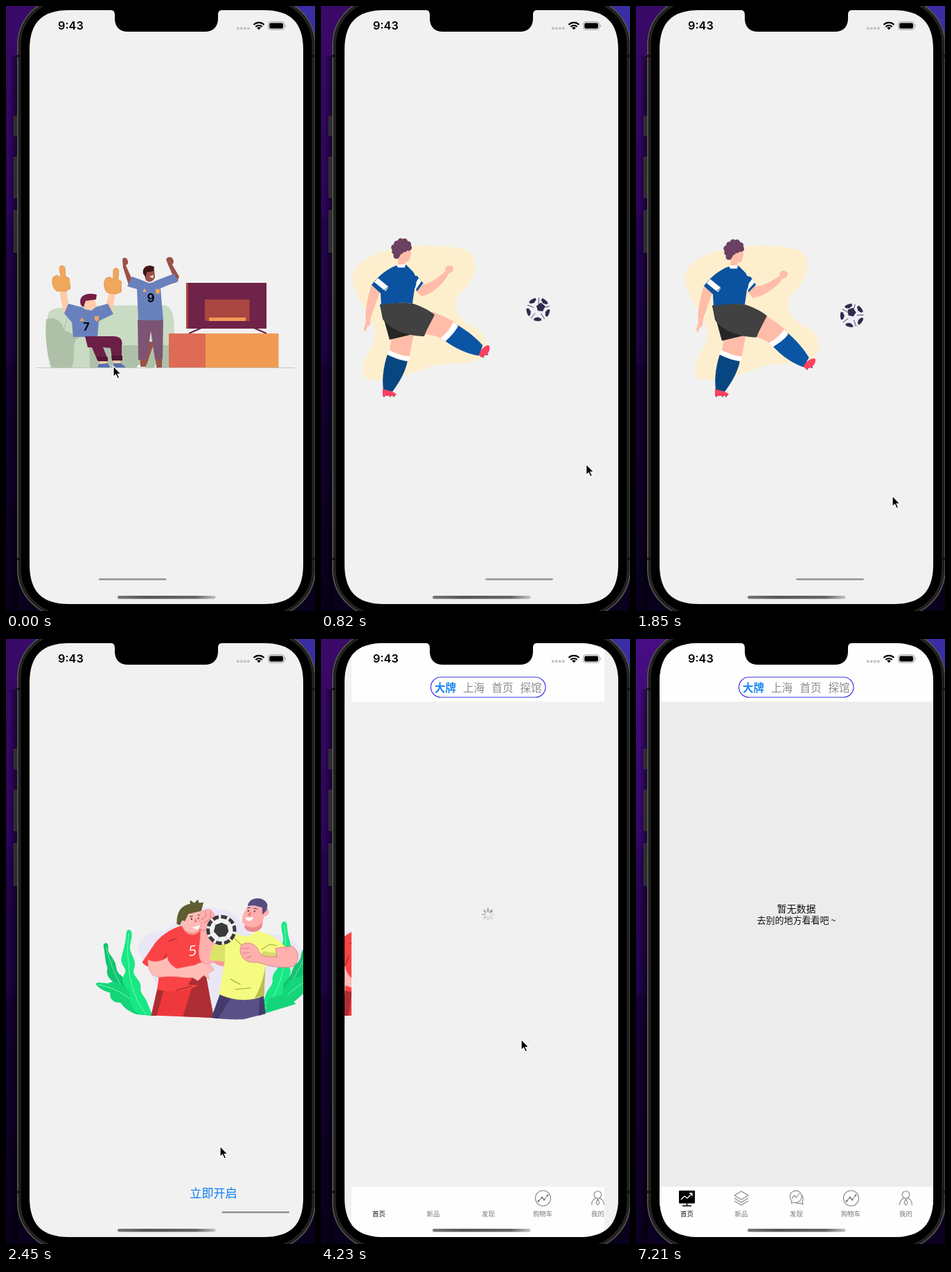
These frames come from a looping animation (446x872 px, 7.31 s). An HTML page:

```html
<!DOCTYPE html>
<html lang="zh-CN">
<head>
<meta charset="utf-8">
<title>Onboarding</title>
<style>
/* --o page offset, --u heading duel, --k kick, --s push slide */
@property --o { syntax: "<number>"; inherits: true; initial-value: 0 }
@property --u { syntax: "<number>"; inherits: true; initial-value: 0 }
@property --k { syntax: "<number>"; inherits: true; initial-value: 0 }
@property --s { syntax: "<number>"; inherits: true; initial-value: 1 }

html, body { margin: 0; width: 100%; height: 100%; overflow: hidden; background: #000 }
svg { display: block; width: 446px; height: 872px }
text { font-family: "Noto Sans CJK SC", "Noto Sans CJK", "Noto Sans", sans-serif }
.mid { text-anchor: middle }

.app { animation: scroll 7310ms infinite, push 7310ms infinite }
.old { transform: translateX(calc((1 - var(--s)) * -112px)) }
.new { transform: translateX(calc(var(--s) * 395px)) }
.pages { transform: translateX(calc(var(--o) * -395px)) }
.bar { transform: translateX(calc(var(--o) * 97.2px)) }
@keyframes scroll {
  0%, .82% { --o: 0; animation-timing-function: cubic-bezier(.2,.6,.3,1) }
  3.7%, 10.94% { --o: 1; animation-timing-function: cubic-bezier(.3,.2,.3,1) }
  15.05%, 21.89% { --o: 2; animation-timing-function: cubic-bezier(.3,.2,.3,1) }
  25.31%, 30.1% { --o: 1; animation-timing-function: ease-in-out }
  33.45%, 34.15% { --o: 1.8265; animation-timing-function: ease-out }
  36.25%, 100% { --o: 2 }
}
@keyframes push {
  0%, 51.44% { --s: 1; animation-timing-function: cubic-bezier(.25,.5,.4,1) }
  55.95% { --s: .07 }
  57.8%, 58.6% { --s: .0253 }
  58.69%, 100% { --s: 0 }
}

/* two fans */
.wave { animation: wave 7310ms infinite }
@keyframes wave { 0%, .82% { rotate: 0deg } 4% { rotate: 7deg } 8%, 100% { rotate: 0deg } }

/* kicker */
.kick { animation: kick 7310ms cubic-bezier(.37,0,.63,1) infinite }
.leg { transform: rotate(calc(var(--k) * 7deg)); transform-origin: 165px 450px }
.arm { transform: rotate(calc(var(--k) * 5deg)); transform-origin: 165px 405px }
.body { transform: translateY(calc(var(--k) * 1px)) }
.shot { transform: translate(calc(321px - var(--k) * 18px), calc(443px + var(--k) * 6px)) rotate(calc(var(--k) * -40deg)) }
@keyframes kick { 0% { --k: .5 } 3.97%, 4.7% { --k: 0 } 12% { --k: -1 } 22% { --k: 1 } 32% { --k: -1 } 100% { --k: .5 } }

/* heading duel */
.duel { animation: duel 7310ms cubic-bezier(.37,0,.63,1) infinite }
@keyframes duel {
  0%, 4.57% { --u: 1.15 } 20.71% { --u: -.1 } 36.85% { --u: 1.15 }
  53% { --u: -.1 } 69.14%, 100% { --u: 1.15 }
}
.lean { transform: skewX(calc(var(--u) * -10deg)) scaleY(calc(1 + var(--u) * .04)); transform-origin: 0 543px }
.redarm { transform: translate(calc(var(--u) * 9px), calc(var(--u) * -7px)) rotate(calc(var(--u) * -17deg)); transform-origin: 125px 475px }
.yhead { transform: translate(calc(var(--u) * 5px), calc(var(--u) * -7px)) rotate(calc(var(--u) * 9deg)); transform-origin: 280px 425px }
.fist { transform: translateX(calc(var(--u) * 15px)) rotate(calc(var(--u) * -22deg)); transform-origin: 215px 455px }
.yarm { transform: translate(calc(var(--u) * 3px), calc(var(--u) * -3px)) rotate(calc(var(--u) * 22deg)); transform-origin: 342px 460px }
.header { transform: translate(calc(193px + var(--u) * 48px), calc(364px + var(--u) * 54px)) rotate(calc(var(--u) * 50deg)) }

.btn { animation: press 7310ms infinite }
@keyframes press { 0%, 46.24% { opacity: 1 } 46.79%, 48.15% { opacity: .2 } 50.62%, 100% { opacity: 1 } }

/* home screen */
.spin { animation: gone 7310ms infinite }
.spin g { animation: turn 609.1667ms steps(8) infinite; transform-origin: 231px 397px }
@keyframes turn { to { rotate: 360deg } }
@keyframes gone { 0%, 71% { opacity: 1 } 71.01%, 100% { opacity: 0 } }
.icons { animation: icons 7310ms infinite }
@keyframes icons { 0%, 60.73% { opacity: 0 } 60.74%, 100% { opacity: 1 } }
.empty { animation: empty 7310ms infinite }
@keyframes empty { 0%, 71% { opacity: 0 } 77.15%, 100% { opacity: 1 } }
.edge { animation: edge 7310ms infinite }
@keyframes edge { 0%, 55.94% { opacity: 0 } 55.95%, 98.62% { opacity: 1 } 98.63%, 100% { opacity: 0 } }
.last { animation: last 7310ms infinite }
@keyframes last { 0%, 98.62% { opacity: 0 } 98.63%, 100% { opacity: 1 } }

.cursor { animation: cursor 7310ms ease-in-out infinite }
@keyframes cursor {
  0%, .82% { translate: 155px 519px }
  3.9%, 4.7% { translate: 218px 519px }
  10.94% { translate: 385px 660px }
  14% { translate: 260px 682px }
  17.6%, 18.4% { translate: 350px 689px }
  21.89% { translate: 250px 700px }
  25.31% { translate: 370px 706px }
  30.1% { translate: 385px 720px }
  33.45%, 34.15% { translate: 309px 731px }
  37% { translate: 240px 775px }
  41% { translate: 246px 823px }
  44.46% { translate: 238px 794px }
  47.6%, 48.3% { translate: 286px 578px }
  57.87%, 84.95% { translate: 289px 577px }
  92.61%, 100% { translate: 430px 876px }
}
</style>
</head>
<body>
<svg viewBox="0 0 446 872">
<defs>
  <linearGradient id="night" x1="0" y1="0" x2="0" y2="1">
    <stop offset="0" stop-color="#3a0a68"/><stop offset=".34" stop-color="#2c0559"/>
    <stop offset=".355" stop-color="#24044d"/><stop offset=".585" stop-color="#1d0342"/><stop offset=".595" stop-color="#150134"/><stop offset="1" stop-color="#09001b"/>
  </linearGradient>
  <linearGradient id="dusk" x1="0" y1="0" x2="0" y2="1">
    <stop offset="0" stop-color="#470d84"/><stop offset=".34" stop-color="#340869"/>
    <stop offset=".355" stop-color="#2b065b"/><stop offset=".585" stop-color="#21044b"/><stop offset=".595" stop-color="#170238"/><stop offset="1" stop-color="#0b0020"/>
  </linearGradient>
  <linearGradient id="shade"><stop offset=".3" stop-opacity="0"/><stop offset="1" stop-opacity=".55"/></linearGradient>
  <linearGradient id="home"><stop offset="0" stop-color="#777"/><stop offset=".3" stop-color="#555"/><stop offset=".8" stop-color="#666"/><stop offset="1" stop-color="#c4c4c4"/></linearGradient>
  <clipPath id="screen"><path d="M34 63C34 24 52 6 91 6H372C411 6 429 24 429 63V805C429 844 411 862 372 862H91C52 862 34 844 34 805Z"/></clipPath>
  <clipPath id="round"><circle r="17"/></clipPath>
  <g id="leafA"><path fill="#17e884" d="M105 425C105 417 114 417 113 427C113 436 108 442 112 452C115 460 120 466 116 476C113 486 126 490 126 502C124 512 134 516 136 526L143 543L124 541C108 530 110 516 110 508C98 498 98 490 103 482C107 474 96 470 98 460C100 450 104 440 105 425Z"/><path fill="none" stroke="#7df5b9" d="M109 424C104 455 110 465 109 480C113 500 117 520 134 541"/></g>
  <g id="leafB"><path fill="#12c472" d="M72 442C73 436 80 437 79 445C78 453 84 456 87 463C92 470 89 476 95 483C104 488 102 498 108 504C118 512 122 524 130 542L118 539C100 534 96 524 96 514C84 508 84 502 86 494C78 488 76 482 78 474C74 464 75 456 72 442Z"/><path fill="none" stroke="#6eeaab" d="M76 444C82 470 92 495 122 538"/></g>
  <g id="leafC"><path fill="#14d579" d="M61 497C64 493 72 497 80 496C90 490 97 499 104 502C116 502 122 512 126 520C132 528 138 534 143 543L120 541C108 538 102 528 96 524C86 525 80 517 82 510C74 508 64 503 61 497Z"/><path fill="none" stroke="#7df5b9" d="M64 498C90 503 112 515 132 541"/></g>
  <path id="foam" fill="#f0a75c" stroke="#d98d42" stroke-width=".7" d="M68 391L73 388L79 391L77 378C77 373 85 373 85 378L86 390L91 392L93 407L87 411L73 411C66 405 66 396 68 391Z"/>
  <path id="patch" fill="#2f2b4d" d="M-6-18L6-18L5-13L0-11L-5-13Z"/>
</defs>

<rect width="446" height="872" fill="url(#night)"/>
<rect class="last" width="446" height="872" fill="url(#dusk)"/>
<rect y="72" width="17" height="800" fill="url(#shade)"/>
<path fill="#3b2da4" d="M400 0H446V40Z"/>
<g fill="#2b2b2c" stroke="#48484a" stroke-width=".7">
  <rect x="11.5" y="159" width="6" height="28"/><rect x="11.5" y="218" width="6" height="58"/><rect x="11.5" y="295" width="6" height="60"/>
</g>
<rect x="17" y="-12" width="429" height="892" rx="68" stroke="#53524e" stroke-width="2"/>
<rect x="20" y="-9" width="423" height="886" rx="65" fill="none" stroke="#242422" stroke-width="3"/>
<path stroke="#111" stroke-width="3" d="M16 72H21M16 797H21M442 72H446M442 797H446"/>

<g clip-path="url(#screen)" class="app">
  <rect x="34" y="6" width="395" height="856" fill="#f1f1f1"/>
  <g class="old">
    <g class="pages">

      <!-- fans at the TV -->
      <g>
        <path fill="#c9dbc3" d="M62 441C75 430 92 438 110 432L228 431C240 433 243 448 243 470V521H64C58 500 56 460 62 441Z"/>
        <path fill="#aec1a8" d="M58 452C70 446 82 455 84 468C95 470 102 478 110 478L118 489H240V521H66C58 500 56 470 58 452Z"/>
        <path fill="#c9dbc3" d="M100 482C105 475 117 476 120 483L121 521H95C100 508 96 494 100 482Z"/>
        <path fill="none" stroke="#a9bba3" d="M84 468C85 455 90 446 94 440M160 487V521"/>
        <path stroke="#c4c4c4" stroke-width="1.2" d="M44 521.5H417"/>
        <g class="wave" style="transform-origin:92px 440px"><path fill="#ffcba9" d="M77 410L87 409L92 440L83 443Z"/><use href="#foam"/></g>
        <g class="wave" style="transform-origin:145px 440px"><path fill="#ffcba9" d="M149 413L158 412L153 444L142 441Z"/><use href="#foam" transform="rotate(9 160 400) translate(75 4)"/></g>
        <path fill="#6881bd" d="M90 429L109 434C117 440 124 439 130 434L147 429L155 444L134 454L132 477H97L95 456L84 443Z"/>
        <path fill="#f0a75c" d="M128 447h6v5l-3 3-3-3ZM106 454l4-5 3 5Z"/>
        <path fill="#ffcba9" d="M110 423L128 421L130 431L124 439C116 438 112 433 109 428Z"/>
        <path fill="#761c48" d="M108 431C104 419 114 412 131 416L130 423L115 425L112 434Z"/>
        <path fill="#6b1f47" d="M114 476H152C166 475 169 482 167 490V509H153L151 493L140 492L147 509L132 511L124 492H118Z"/>
        <path fill="#521533" d="M131 506H147V512H133ZM152 504H168V511H153Z"/>
        <path fill="#ffcba9" d="M135 512H145V517H135ZM155 511H165V516H155Z"/>
        <path fill="#596fae" d="M134 516L147 515L150 521H132ZM155 515L166 515L173 521H155Z"/>
        <text class="mid" x="116" y="467.5" font-size="16" font-weight="700" style="font-family:Inter,sans-serif">7</text>

        <g class="wave" style="transform-origin:185px 398px"><path fill="#9a5148" d="M168 365C171 360 177 364 176 371L173 374L182 394L178 405L169 377Z"/></g>
        <g class="wave" style="transform-origin:232px 398px"><path fill="#9a5148" d="M231 365C235 359 242 362 242 369L240 373L250 390L247 398L222 405L223 395L241 389L234 373Z"/></g>
        <path fill="#9a5148" d="M192 484H226L225 517H217L212 490L203 517H194Z"/>
        <path fill="#7d5473" d="M190 452L227 451L226 509H215L209 468L203 510H191Z"/>
        <path fill="#fff" d="M189 521C189 516 196 516 202 521ZM214 521L218 515L225 521Z"/><path fill="#9a5148" d="M194 510h8v10h-8ZM217 510h8v11h-8Z"/>
        <path fill="#6881bd" d="M182 390L201 397C207 401 211 399 216 396L242 386L249 396L223 407L227 453H191L189 408L175 404Z"/>
        <path fill="#f0a75c" d="M216 408h6v5l-3 3-3-3ZM197 412l3-5 3 5Z"/>
        <path fill="#9a5148" d="M199 382L214 380L215 391C211 400 203 399 201 393Z"/>
        <path fill="#3f1615" d="M198 386C196 375 206 372 214 376L213 382L203 384L202 391Z"/><path fill="#fff" d="M207 390l6-2-1 4Z"/>
        <text class="mid" x="209" y="427" font-size="17" font-weight="700" style="font-family:Inter,sans-serif">9</text>

        <path stroke="#6b1f47" stroke-width="2" d="M282 464L264 472M358 464L376 472"/>
        <rect x="260" y="399" width="116" height="66" fill="#702349"/><rect x="260" y="399" width="3" height="66" fill="#a9463f"/>
        <rect x="287" y="423" width="64.5" height="31" fill="#a9463f"/><rect x="293" y="449" width="53" height="5" fill="#f09a54"/>
        <rect x="235" y="472" width="53" height="49" fill="#dd6b55"/><rect x="288" y="472" width="105.5" height="49" fill="#f09a54"/>
      </g>

      <!-- kicker -->
      <g transform="translate(395)"><g class="kick">
        <path fill="#fdefcd" d="M95 362C120 345 200 340 235 352C255 365 248 390 235 405C212 425 215 445 240 460C265 470 268 490 260 505C240 520 210 512 180 520C150 535 100 545 88 535C78 515 100 495 103 475C105 455 85 435 75 410C66 390 70 375 95 362Z"/>
        <path fill="#ffbda9" d="M127 478L123 502L152 509L159 472Z"/>
        <path fill="#084681" d="M121 502C115 520 113 537 115 553L128 556C140 540 148 524 150 511Z"/>
        <path fill="#fff" d="M123 496C133 500 143 505 154 505L151 512C140 511 130 507 120 502Z"/>
        <path fill="#ff3f61" d="M114 552L128 556L134 559L132 562H114Z"/><path stroke="#333" stroke-width="1.5" d="M116 562v1.5M125 562v1.5M130 562v1.5"/>
        <g class="body">
          <path fill="#262626" d="M110 432L124 482L162 473L160 440Z"/>
          <g class="leg">
            <path fill="#ffbda9" d="M186 444C198 450 210 458 219 464L199 488C190 479 182 478 172 475Z"/>
            <path fill="#0b55a5" d="M220 467C234 478 246 490 253 501L246 515C230 511 212 500 199 487Z"/>
            <path fill="#fff" d="M215 462L221 469C216 477 208 483 200 489L194 483C203 478 210 471 215 462Z"/>
            <path fill="#ff3f61" d="M246 514C249 506 258 500 262 502C265 510 256 518 248 517Z"/>
            <path stroke="#333" stroke-width="1.5" d="M251 517l1 1.5M257 514l2 1.5"/>
          </g>
          <path fill="#414141" d="M110 431C130 428 145 428 158 430C170 434 182 440 189 446C185 455 178 466 174 477C150 477 125 468 114 452Z"/>
          <path fill="#ffbda9" d="M98 403C91 425 88 445 90 455L87 466L89 471L92 463L96 461L97 450L110 413Z"/>
          <g class="arm">
            <path fill="#ffbda9" d="M160 409L169 420C186 418 205 401 211 390C218 390 221 381 214 379C207 378 205 384 207 386C195 395 183 403 172 403Z"/>
            <path fill="#0b52a0" d="M155 388L165 390L173 401L163 412Z"/><path fill="#fff" d="M167 393L171 398L161 410L158 406Z"/>
          </g>
          <path fill="#0b52a0" d="M134 375C120 380 108 390 98 403L111 415L112 432C130 428 145 428 157 430L160 409C165 400 162 390 158 384L148 374Z"/>
          <path fill="#fff" d="M107 393L123 406L118 412L102 399Z"/><path fill="none" stroke="#084681" d="M112 414L126 403"/>
          <path fill="#ffbda9" d="M138 352L152 350L155 356C154 369 150 371 147 369L146 375L136 376L137 364Z"/>
          <path fill="#fff" d="M134 374L147 373L146 378L136 378Z"/>
          <path fill="#6b4060" stroke="#6b4060" stroke-width="9" stroke-linecap="round" stroke-dasharray="0 6.5" d="M134 361L130 350L136 342L143 339L150 343L153 349L143 352L137 356Z"/>
        </g>
        <g class="shot">
          <circle r="17" fill="#efeef5"/>
          <g clip-path="url(#round)">
            <path fill="none" stroke="#2f2b4d" stroke-width=".8" d="M0 7V17M6.7 2L16 5M-6.7 2L-16 5M4-6L10-14M-4-6L-10-14"/>
            <path fill="#cbc9dc" d="M-17 6C-10 18 10 18 17 6L17 18H-17Z" opacity=".6"/>
            <path fill="#2f2b4d" d="M0 5L-6 1L-4-7H4L6 1Z" transform="translate(1 -3)"/>
            <use href="#patch"/><use href="#patch" transform="rotate(72)"/><use href="#patch" transform="rotate(144)"/><use href="#patch" transform="rotate(216)"/><use href="#patch" transform="rotate(288)"/>
          </g>
        </g>
      </g></g>

      <!-- heading duel -->
      <g transform="translate(790)"><g class="duel">
        <path fill="#e9e7f6" d="M122 450C120 432 138 420 160 420L190 398C205 384 245 382 264 400L285 425C320 422 352 428 358 452C360 490 340 500 320 512L300 540L235 545L150 500Z"/>
        <use href="#leafB"/><use href="#leafC"/><use href="#leafA"/>
        <use href="#leafB" transform="matrix(-1 0 0 1 448 -17)"/><use href="#leafC" transform="matrix(-1 0 0 1 459 -15)"/><use href="#leafA" transform="matrix(-1 0 0 1 442 -12)"/>
        <path fill="#14d579" d="M304 540L310 518L335 512L350 526Z"/>

        <g class="lean">
          <path fill="#f79a99" d="M214 440L243 438L242 472C232 478 219 472 213 466L222 460Z"/>
          <path fill="#ad2d34" d="M192 430L212 426L244 437L216 462L203 470Z"/>
          <path fill="#ee393c" d="M143 500L141 542.5L232 546L203 470Z"/>
          <path fill="#ad2d34" d="M193 500L187 544L232 546L203 470ZM143 506H153L149 543H141Z"/>
          <path fill="#fa4344" d="M163 418C150 421 136 430 128 442L114 469C122 477 133 477 141 474L143 507C165 512 190 508 203 500L200 462L208 425L192 418C185 432 168 430 163 418Z"/>
          <path fill="none" stroke="#ad2d34" stroke-width="1.5" d="M141 474L147 457M147 440L158 436M170 508L192 502M150 512L146 534"/>
          <path fill="#ad2d34" d="M201 470L186 500L203 501Z"/>
          <text x="178" y="460" font-size="20" fill="#fff" transform="rotate(-8 183 452)" style="font-family:'Open Sans',sans-serif">5</text>
          <path fill="#f09793" d="M162 414L188 418L189 426C182 436 168 430 163 420Z"/>
          <path fill="#ffbcb6" d="M161 408L167 401L187 397L190 413C190 422 186 427 179 428C170 428 165 422 161 418Z"/>
          <path fill="#5e5c30" d="M153 410C152 395 158 390 168 388L167 383L174 387L178 382L181 387L187 386L186 398L168 402L165 412L161 411L159 418L154 416Z"/>
          <path fill="none" stroke="#5e5c30" stroke-width="1.5" d="M171 406l4-1M182 404l4-1"/><g fill="#333"><circle cx="174" cy="409" r="1.2"/><circle cx="184" cy="408" r="1.2"/></g>
          <path fill="#f07f7c" d="M179 407l4 6-4 1Z"/><path fill="#fff" d="M177 421L188 418L186 424Z"/>
          <path class="redarm" fill="#ffbcb6" stroke="#eb9a96" stroke-width=".6" d="M114 469C111 488 117 497 134 500C150 503 160 511 172 513L179 520L188 515L195 523L194 514L203 512C201 500 189 493 178 497L152 494C145 487 141 481 141 474C133 477 122 477 114 469Z"/>
        </g>

        <path fill="#5a5088" d="M241 510L228 546C245 548 265 549 275 548L306 540L303 512Z"/>
        <path fill="#443b6c" d="M241 510L228 546L238 547L256 517ZM298 515L296 543L306 540L303 512Z"/>
        <g class="fist"><path fill="#ffb0ae" stroke="#e88e90" stroke-width=".6" d="M242 440C230 441 222 436 226 420L233 415C241 410 240 395 234 392C224 388 213 395 216 407L212 415C206 430 195 443 195 455C196 466 215 468 230 463Z"/><path fill="none" stroke="#d97c80" d="M218 402l9-2 2-8M220 408l12-3 3-9M211 416l12 3"/></g>
        <path fill="#f4fb80" d="M260 421C270 431 285 431 293 420L308 425C322 430 332 440 337 447L312 460L306 470L304 514C285 523 260 522 239 512L247 465L225 462L229 444Z"/>
        <path fill="#dbe26a" d="M229 444L248 436L247 465L225 462Z"/>
        <path fill="#b9bd52" d="M306 470L304 514L290 518C298 505 303 490 306 470Z"/>
        <path fill="none" stroke="#b9bd52" stroke-width="1.5" d="M262 432L272 442M300 448L312 440L322 442M255 490L270 498M262 505L285 503"/>
        <g class="yhead">
          <path fill="#ed8688" d="M272 415L295 405L295 420C290 432 272 431 270 423Z"/>
          <path fill="#ffaeac" d="M270 393L295 388L299 393C304 395 301 404 296 404L294 414C288 425 272 425 266 417C263 408 268 400 270 393Z"/>
          <path fill="#544e80" d="M270 393C269 380 291 374 298 387V395L293 402L291 392L279 391Z"/>
          <path fill="#fff" d="M269 410L281 408C279 416 271 416 269 410Z"/>
          <g fill="#333"><circle cx="272" cy="400" r="1.1"/><circle cx="281" cy="399" r="1.1"/></g><path fill="none" stroke="#544e80" stroke-width="1.3" d="M270 396l4-1M279 395l5 0"/><path fill="#ed7375" d="M276 400l-4 6 4 1Z"/>
        </g>
        <g class="yarm"><path fill="#b9bd52" d="M300 470L322 464L330 482L300 489Z" opacity=".5"/><path fill="#ffb0ae" stroke="#d97c80" stroke-width=".8" d="M336 447C349 450 355 463 348 474C335 483 314 487 302 487C293 489 290 494 279 491C272 488 265 479 269 472C275 464 289 465 294 472C304 480 313 472 322 470L315 459Z"/><path fill="none" stroke="#d97c80" d="M270 478l10-4M274 484l9-5M281 489l6-6"/></g>
        <g class="header">
          <circle r="21" fill="#f3f3f3"/>
          <circle r="19.2" fill="none" stroke="#3a3a3a" stroke-width="5" stroke-dasharray="8.8 3.264"/>
          <path fill="#3a3a3a" d="M0-11L8-7L11 1L6 9L-5 10L-11 2L-8-7Z"/>
          <path stroke="#d2d2d2" d="M0-11V-17M11 1L17 3M6 9L10 14M-5 10L-8 15M-11 2L-17 3"/>
        </g>
        <text class="mid btn" x="231" y="804.5" font-size="17" fill="#0a7cf5">立即开启</text>
      </g></g>
    </g>
    <rect class="bar" x="134" y="825" width="97.5" height="2.6" rx="1.3" fill="#929292"/>
  </g>

  <!-- home screen -->
  <g class="new">
    <rect x="34" y="6" width="395" height="856" fill="#f1f1f1"/>
    <rect class="last" x="34" y="90" width="395" height="700" fill="#ececec"/>
    <path fill="#fefefe" d="M34 6H429V90.5H34ZM34 789.5H429V862H34Z"/>
    <rect x="148.5" y="55" width="165.5" height="29" rx="14.5" fill="#fff" stroke="#3a38e8" stroke-width="1.2"/>
    <g class="mid" font-size="15.5" font-weight="500" fill="#8c8c8c">
      <text x="169.5" y="75.5" font-weight="700" fill="#1a86f2">大牌</text><text x="210.5" y="75.5">上海</text><text x="252" y="75.5">首页</text><text x="293" y="75.5">探馆</text>
    </g>
    <g class="spin"><g stroke="#8a8a8e" stroke-width="2.3" stroke-linecap="round">
      <path d="M235.5 397H239"/><path d="M234.2 393.8L236.7 391.3" opacity=".85"/><path d="M231 392.5V389" opacity=".7"/><path d="M227.8 393.8L225.3 391.3" opacity=".55"/>
      <path d="M226.5 397H223" opacity=".45"/><path d="M227.8 400.2L225.3 402.7" opacity=".35"/><path d="M231 401.5V405" opacity=".3"/><path d="M234.2 400.2L236.7 402.7" opacity=".25"/>
    </g></g>
    <g class="mid empty" fill="#111"><text x="231.5" y="394" font-size="14">暂无数据</text><text x="231.5" y="410" font-size="13">去别的地方看看吧 ~</text></g>
    <g class="mid" font-size="9.4" fill="#777">
      <text x="73.5" y="832" font-weight="500" fill="#111">首页</text><text x="152" y="832">新品</text><text x="231.5" y="832">发现</text><text x="310" y="832">购物车</text><text x="389.5" y="832">我的</text>
    </g>
    <g fill="none" stroke="#858585" stroke-width="1.1" stroke-linejoin="round">
      <g class="icons">
        <rect x="62" y="795" width="23" height="18.5" rx="1" fill="#000" stroke="none"/>
        <path stroke="#000" stroke-width="1.5" d="M73.5 813V817M67 817H80"/><path stroke="#fff" stroke-width="1.3" d="M65 808L70 803L74 806L81 799M77 799H81V803"/>
        <path d="M142 802L152 796L162 802L152 808ZM142 806L152 812L162 806M142 810L152 816L162 810"/>
        <path d="M224 813L225 810A8.5 8.5 0 1 1 229 812ZM238 801A7 7 0 0 1 240 811L241 815L237 813A7 7 0 0 1 230 812M225 806L229 802L231 805L236 799"/>
      </g>
      <circle cx="310.5" cy="806" r="11"/><path d="M304 810L309 805L312 808L317 802"/>
      <g fill="#777" stroke="none"><circle cx="304" cy="810" r="1.5"/><circle cx="309" cy="805" r="1.5"/><circle cx="312" cy="808" r="1.5"/><circle cx="317" cy="802" r="1.5"/></g>
      <circle cx="389.5" cy="801" r="5.3"/><path d="M381 816C380 811 383 807 387 806M398 816C399 811 396 807 392 806M389.5 807L387 813L389.5 816L392 813Z"/>
    </g>
  </g>
  <path class="edge" fill="#f1f1f1" d="M409 6H429V90.5H409ZM409 789.5H429V862H409Z"/>

  <!-- status bar and home indicator -->
  <text x="75" y="34.2" font-size="16.3" font-weight="600" style="font-family:Inter,sans-serif">9:43</text>
  <path stroke="#c3c3c3" stroke-width="3.6" stroke-dasharray="3.6 1.4" d="M333 32.3H352"/>
  <g fill="none" stroke="#000" stroke-width="2.1"><path d="M357.5 27A10.5 10.5 0 0 1 372.5 27M360.3 30A6.5 6.5 0 0 1 369.7 30"/></g><path d="M362.2 31.5A4 4 0 0 1 367.8 31.5L365 34.3Z"/>
  <rect x="378.6" y="22.8" width="23" height="11.3" rx="3.3" fill="none" stroke="#999"/><rect x="380.2" y="24.4" width="19.8" height="8.1" rx="2"/><path fill="#999" d="M403 26.5C404.5 27 404.5 30 403 30.5Z"/>
  <rect x="161" y="850" width="141.5" height="4.6" rx="2.3" fill="url(#home)"/>
</g>
<path d="M150 5.5C155 6 157 8 157 13V18C157 30 164 37 176 37H287C299 37 306 30 306 18V13C306 8 308 6 313 5.5Z"/>

<g class="cursor"><path stroke="#fff" stroke-width="1.2" d="M0 0V15.5L3.5 12.3L6.2 18L8.7 16.9L6.2 11.3H11Z"/></g>
</svg>
</body>
</html>
```
